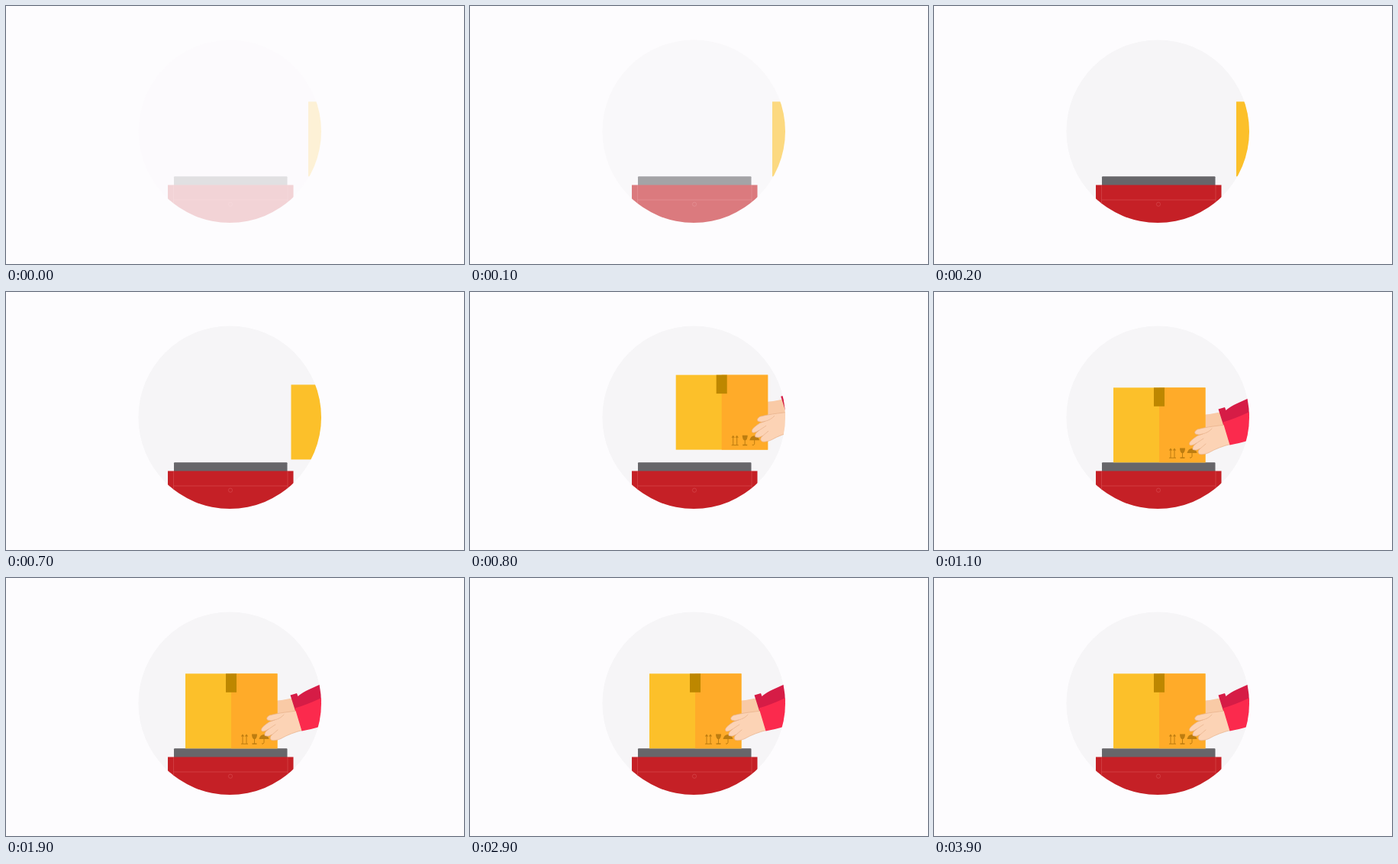
Write an HTML page that moves like this. It is 600 by 338 pixels and loops after 4000 ms.

```html
<!DOCTYPE html>
<html lang="en">
<head>
<meta charset="utf-8">
<title>Parcel on a scale</title>
<style>
  html, body { margin: 0; width: 100%; height: 100%; overflow: hidden; background: #fdfcfe; }
  svg { display: block; width: 600px; height: 338px; }
</style>
</head>
<body>
<svg viewBox="0 0 600 338">
  <clipPath id="disc"><circle cx="293.2" cy="164.2" r="119.8"/></clipPath>
  <g id="scene" clip-path="url(#disc)">
    <rect x="170" y="40" width="250" height="250" fill="#f6f5f7"/>

    <g id="scale">
      <rect x="220" y="223.3" width="148.5" height="14" rx="1" fill="#67666a"/>
      <rect x="212" y="234.5" width="164.5" height="52" fill="#c52026"/>
      <g fill="none" stroke="#d5484c" stroke-width=".7">
        <path d="M219.5 235V262M369 235V262M219.5 254H369"/>
        <circle cx="294" cy="259.7" r="2.6"/>
      </g>
    </g>

    <g id="parcel">
      <path d="M350 161Q364 160 377 157L384 178L350 186Z" fill="#f9caa6"/>
      <rect x="235" y="125.3" width="120.5" height="98" fill="#fcc02a"/>
      <rect x="295" y="125.3" width="60.5" height="98" fill="#ffab29"/>
      <rect x="288" y="125.3" width="14" height="24.5" fill="#bd8700"/>

      <g fill="#bd7d10">
        <path d="M307.8 207.5L310 204.5L312.2 207.5ZM312.8 207.5L315 204.5L317.2 207.5Z"/>
        <path d="M322 204.5H329Q329 210.5 325.5 211.5Q322 210.5 322 204.5ZM322.5 216.5H328.5V218H322.5Z"/>
        <path d="M331.5 211Q333 205 338 205Q343 205 344.5 211Z"/>
      </g>
      <path d="M310 206V217.3M315 206V217.3M308 217.3H317M325.5 211V217M338 210V215.5Q337.5 218 335 217" fill="none" stroke="#bd7d10"/>

      <g stroke="#e7b08a" stroke-width=".7" stroke-linejoin="round" stroke-linecap="round">
        <path fill="#fcd3b5" d="M381 174L362 176.5Q352 178 345 180Q340 183 342.5 186
          Q347 188 352 186Q344 188 340 192Q333 197 335 200.5Q338 202 344 198
          Q338 202 339 206.5Q343 208.5 349 205Q344 209 347.5 212.3
          Q352 214 360 210.5Q373 203 390 199Z"/>
        <path fill="none" d="M352 186Q360 184 364 179M344 198L353 192M349 205L356 199"/>
      </g>

      <path d="M372.5 153.5L381 151L382.5 155Q388 150 397 146L430 131V156L379 174Z" fill="#d61c46"/>
      <path d="M378.5 170.5Q398 165 430 149V189Q405 197 387.5 200.5Z" fill="#fb2a4d"/>
    </g>
  </g>
</svg>
<script>
  const LOOP = 4000;
  const START = [161, 0], LIFT = [13.5, -19], REST = [0, 0];
  const scene = document.getElementById('scene');
  const parcel = document.getElementById('parcel');

  const progress = (t, from, to) => Math.min(1, Math.max(0, (t - from) / (to - from)));
  const easeInOut = p => p < .5 ? 4 * p ** 3 : 1 - 4 * (1 - p) ** 3;
  const mix = (a, b, p) => a + (b - a) * p;

  function parcelOffset(t) {
    if (t < 900) {
      const p = easeInOut(progress(t, 600, 900));
      return [mix(START[0], LIFT[0], p), mix(START[1], LIFT[1], p ** .85)];
    }
    const p = easeInOut(progress(t, 900, 1100));
    return [mix(LIFT[0], REST[0], p), mix(LIFT[1], REST[1], p)];
  }

  function draw(now) {
    const t = now % LOOP;
    scene.setAttribute('opacity', mix(.18, 1, progress(t, 0, 200)));
    parcel.setAttribute('transform', `translate(${parcelOffset(t)})`);
    requestAnimationFrame(draw);
  }
  draw(0);
</script>
</body>
</html>
```
